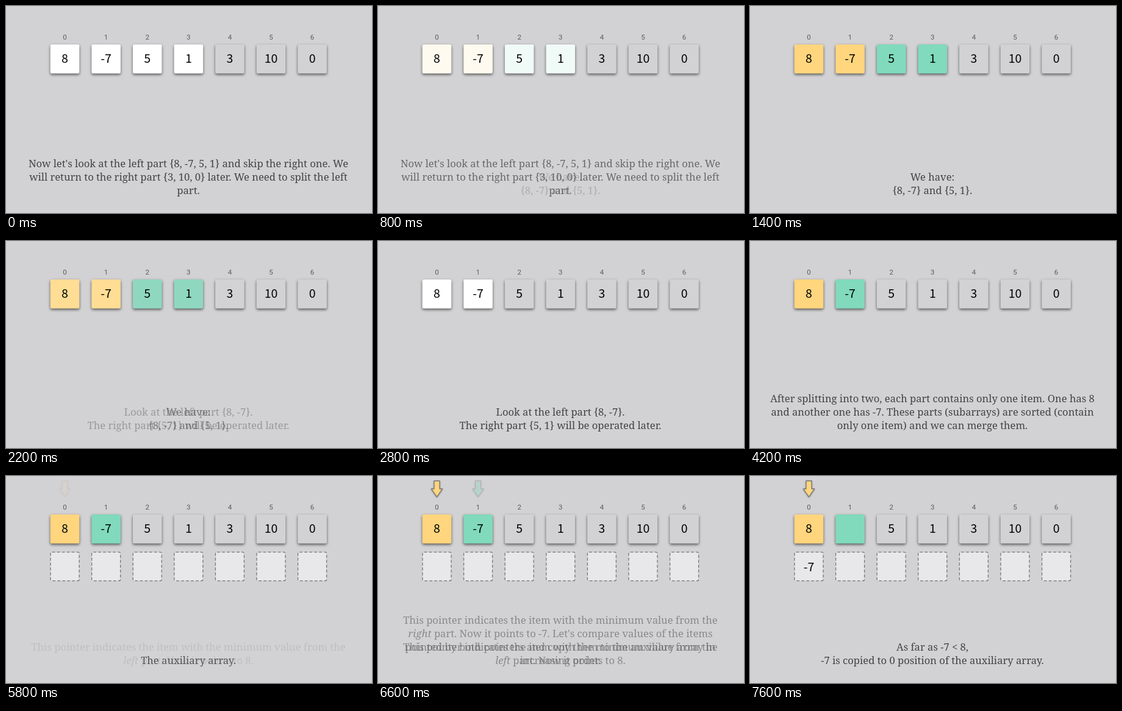
Animation of 600 by 339 pixels, one loop 8 s. Source, as an HTML page:

```html
<!DOCTYPE html>
<html lang="en">
<head>
<meta charset="utf-8">
<title>Merge sort</title>
<style>
  html, body { margin: 0; width: 100%; height: 100%; overflow: hidden; background: #d2d1d3; }
  svg { display: block; width: 600px; height: 339px; }
  text { text-anchor: middle; }
  .caption { font: 16.6px "Noto Serif", serif; fill: #444; }
  .caption tspan.em { font-style: italic; }
  .value { font: 19.5px "Noto Sans CJK JP", "Noto Sans CJK SC", "Noto Sans", sans-serif; fill: #000; }
  .index { font: 11.5px Roboto, sans-serif; fill: #5c5c5c; }
  .cell { filter: drop-shadow(0 2px 2px rgba(0, 0, 0, .6)); }
  .slot { fill: #e8e7ea; stroke: #777; stroke-width: 1.3; stroke-dasharray: 5 3; }
  .arrow { stroke: #777; stroke-width: 1.3; stroke-linejoin: round; filter: drop-shadow(0 1px 1px rgba(0, 0, 0, .4)); }
</style>
</head>
<body>
<svg id="stage" viewBox="0 0 600 339"></svg>
<script>
const LOOP = 8000, TICK = 200;
const TEXT_FADE = 230, FADE = 350, COLOR_FADE = 500;
const COLORS = { w: [255, 255, 255], y: [255, 213, 125], g: [128, 218, 187], n: [210, 209, 211] };
const VALUES = [8, -7, 5, 1, 3, 10, 0];
const em = s => `<tspan class="em">${s}</tspan>`;

// Each step fades in its caption; cells lists the colours it gives the array.
const steps = [
  { at: -1000, cells: 'wwwwnnn', lines: [
    "Now let's look at the left part {8, -7, 5, 1} and skip the right one. We",
    'will return to the right part {3, 10, 0} later. We need to split the left',
    'part.'] },
  { at: 740, cells: 'yyggnnn', lines: ['We have:', '{8, -7} and {5, 1}.'] },
  { at: 2110, cells: 'wwnnnnn', lines: [
    'Look at the left part {8, -7}.',
    'The right part {5, 1} will be operated later.'] },
  { at: 3690, cells: 'ygnnnnn', lines: [
    'After splitting into two, each part contains only one item. One has 8',
    'and another one has -7. These parts (subarrays) are sorted (contain',
    'only one item) and we can merge them.'] },
  { at: 4770, lines: ['The auxiliary array.'] },
  { at: 5770, lines: [
    'This pointer indicates the item with the minimum value from the',
    em('left') + ' part. Now it points to 8.'] },
  { at: 6485, lines: [
    'This pointer indicates the item with the minimum value from the',
    em('right') + " part. Now it points to -7. Let's compare values of the items",
    'pointed by both pointers and copy them to the auxiliary array in',
    'increasing order.'] },
  { at: 7080, lines: ['As far as -7 &lt; 8,', '-7 is copied to 0 position of the auxiliary array.'] }
];
const [AUX, LEFT, RIGHT, COPY] = steps.slice(4).map(s => s.at);

const cx = i => 96.5 + 67.6 * i;
const text = (cls, x, y, s, id = '') => `<text class="${cls}" id="${id}" x="${x}" y="${y}">${s}</text>`;
const box = (cls, i, y, size) =>
  `<rect class="${cls}" x="${cx(i) - size / 2}" y="${y}" width="${size}" height="${size}" rx="2.5"/>`;
const arrow = (id, i, color) =>
  `<path class="arrow" id="${id}" fill="rgb(${COLORS[color]})" transform="translate(${cx(i)} 8)"
    d="M-4.5 0H4.5V13H9L0 26L-9 13H-4.5Z"/>`;

const stage = document.getElementById('stage');
stage.innerHTML =
  VALUES.map((v, i) => text('index', cx(i), 55, i) + box('cell', i, 63, 47.6) +
    text('value', cx(i), 93, v, 'v' + i)).join('') +
  `<g id="aux">${VALUES.map((v, i) => box('slot', i, 124.7, 47)).join('')}</g>` +
  text('value', cx(0), 155.5, -7, 'copied') +
  arrow('left', 0, 'y') + arrow('right', 1, 'g') +
  steps.map(({ lines }) => '<g class="caption">' +
    lines.map((s, i) => text('', 299, 308 - 22 * (lines.length - 1 - i), s)).join('') + '</g>').join('');

const cells = stage.querySelectorAll('.cell');
const captions = stage.querySelectorAll('.caption');
const show = (id, opacity) => { document.getElementById(id).style.opacity = opacity; };

function draw(t) {
  const fade = (at, length) => Math.min(1, Math.max(0, (t - at) / length));

  captions.forEach((el, i) => {
    const next = steps[i + 1];
    el.style.opacity = fade(steps[i].at, TEXT_FADE) * (1 - (next ? fade(next.at, TEXT_FADE) : 0));
  });

  cells.forEach((el, i) => {
    let rgb = COLORS.n;
    for (const step of steps.filter(s => s.cells)) {
      const p = fade(step.at, COLOR_FADE), to = COLORS[step.cells[i]];
      rgb = rgb.map((c, k) => c + (to[k] - c) * p);
    }
    el.style.fill = `rgb(${rgb.map(Math.round)})`;
  });

  const copied = fade(COPY, TEXT_FADE);
  show('aux', fade(AUX, FADE));
  show('left', fade(LEFT, FADE));
  show('right', fade(RIGHT, FADE) * (1 - fade(COPY, FADE)));
  show('v1', 1 - copied);
  show('copied', copied);
}

const start = performance.now();
function loop() {
  const t = (performance.now() - start) % LOOP;
  draw(Math.floor(t / TICK) * TICK); // the picture moves in steps of TICK
  requestAnimationFrame(loop);
}
loop();
</script>
</body>
</html>
```
